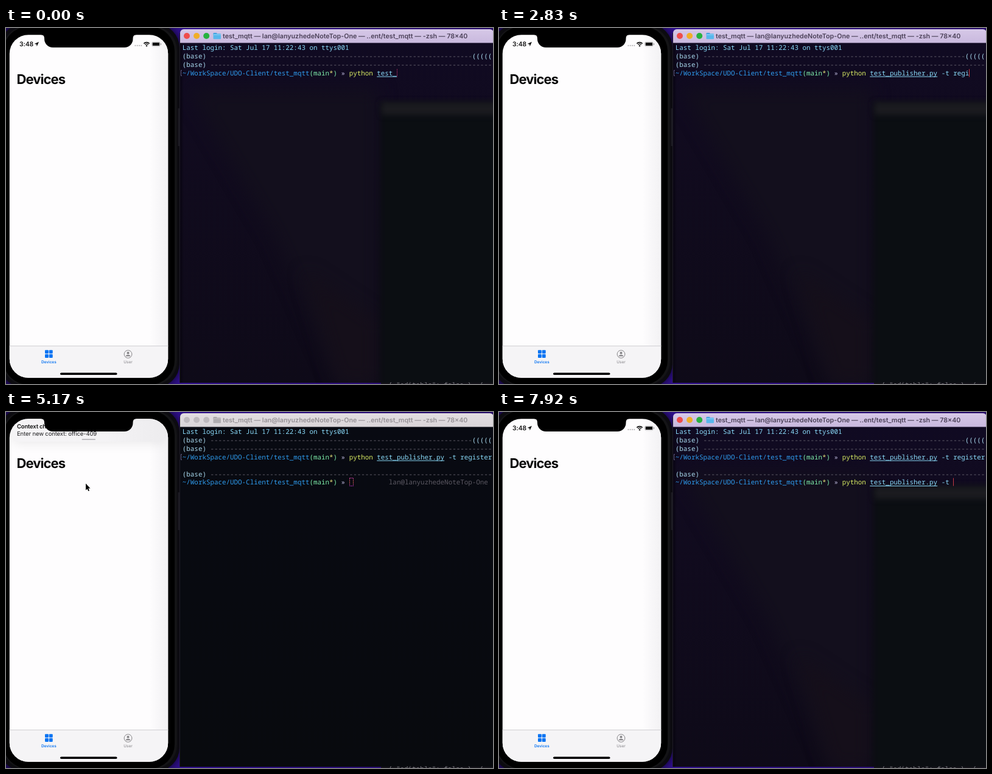
Recreate the animation shown at these times as an HTML page with a canvas. Size 800 px wide and 585 px high, loop 8 s.

```html
<!DOCTYPE html>
<html lang="en">
<head>
<meta charset="utf-8">
<title>Device context demo</title>
<style>
html, body { margin: 0; width: 100%; height: 100%; overflow: hidden; background: #000; }
canvas { display: block; width: 800px; height: 585px; }
</style>
</head>
<body>
<canvas id="stage" width="800" height="585"></canvas>
<script>
const W = 800, H = 585, LOOP = 8000, STEP = 1000 / 12;
const SANS = 'Inter, "Liberation Sans", sans-serif';
const MONO = '500 10.87px "Noto Sans Mono", "DejaVu Sans Mono", monospace';
const COL = 6.52, ROW = 13.86, LEFT = 289.8, BASE = 36.2;
const HOST = 'lan@lanyuzhedeNoteTop-One';
const SCRIPT = 'python test_publisher.py -t register';
const INK = '#8bdcfb', PALE = '#a9d9ee', DIM = '#6b6773', BLUE = '#2f9df0', GREEN = '#7ff0ac';

const stage = document.getElementById('stage');
let c = stage.getContext('2d');

const clamp = v => Math.max(0, Math.min(1, v));
const span = (t, a, b) => clamp((t - a) / (b - a));
const smooth = p => p * p * (3 - 2 * p);
const easeOut = p => 1 - (1 - p) ** 3;
const mix = (a, b, p) => a + (b - a) * p;

function rect(x, y, w, h, fill) {
  c.fillStyle = fill;
  c.fillRect(x, y, w, h);
}
function pill(x, y, w, h, r, fill) {
  c.beginPath();
  c.roundRect(x, y, w, h, r);
  c.fillStyle = fill;
  c.fill();
}
function dot(x, y, r, fill) {
  c.beginPath();
  c.arc(x, y, r, 0, 7);
  c.fillStyle = fill;
  c.fill();
}
function poly(points, fill, stroke, width = 1) {
  c.beginPath();
  points.forEach(([x, y]) => c.lineTo(x, y));
  c.closePath();
  if (stroke) { c.strokeStyle = stroke; c.lineWidth = width; c.stroke(); }
  if (fill) { c.fillStyle = fill; c.fill(); }
}
function label(s, x, y, size, fill, weight = 400, align = 'left', track = 0) {
  c.font = `${weight} ${size}px ${SANS}`;
  c.textRendering = 'geometricPrecision';
  c.letterSpacing = track + 'px';
  c.textAlign = align;
  c.fillStyle = fill;
  c.fillText(s, x, y);
  c.letterSpacing = '0px';
}
function linear(x0, y0, x1, y1, ...stops) {
  const g = c.createLinearGradient(x0, y0, x1, y1);
  stops.forEach(([p, color]) => g.addColorStop(p, color));
  return g;
}

// Draws text on the terminal's character grid.
function cells(s, col, row, fill) {
  c.font = MONO;
  c.textAlign = 'left';
  c.fillStyle = fill;
  [...s].forEach((ch, i) => {
    if (ch !== ' ') c.fillText(ch, LEFT + (col + i) * COL, BASE + row * ROW);
  });
}

// Builds the see-through terminal backdrop once.
function makeBackdrop() {
  const layer = document.createElement('canvas');
  layer.width = W;
  layer.height = H;
  const main = c;
  c = layer.getContext('2d');
  rect(286, 24, 514, 560, linear(286, 24, 286, 584, [0, '#100a22'], [.25, '#110b1f'], [1, '#0e0a18']));
  c.filter = 'blur(14px)';
  poly([[300, 100], [612, 100], [612, 590], [550, 590], [440, 340]], '#130f1d');
  poly([[490, 400], [610, 480], [610, 584], [545, 584]], '#150f1a');
  c.filter = 'blur(5px)';
  rect(615, 122, 210, 480, '#0b0e12');
  rect(617, 122, 210, 21, '#1b1b20');
  c.filter = 'none';
  rect(286, 24, 6, 560, linear(286, 0, 292, 0, [0, 'rgba(5,2,12,.7)'], [1, 'rgba(5,2,12,0)']));
  c = main;
  return layer;
}
const backdrop = makeBackdrop();

function drawDesktop() {
  rect(0, 0, W, H, linear(0, 0, W, 0, [0, '#220a66'], [.36, '#2f0f8c'], [1, '#260b68']));
  rect(616, 583, 184, 2, '#14131a');
  c.save();
  c.shadowColor = 'rgba(0,0,0,.8)';
  c.shadowBlur = 14;
  pill(-10, -6, 295, 596, 38, '#0c0b10');
  c.restore();
  pill(-6, -3, 287, 590, 40, '#141416');
  pill(-4, -2, 281, 588, 40, '#000');
  rect(282.5, 132, 2.5, 62, '#1c1b22');
}

function drawStatus() {
  label('3:48', 22, 30.3, 10.4, '#111', 600, 'left', -.1);
  poly([[54, 22.7], [50.7, 30.3], [50, 26.8], [46.6, 26]], '#111');
  for (let i = 0; i < 4; i++) dot(212.4 + i * 3.3, 28.9, 1.05, '#b9b8bb');
  c.strokeStyle = '#111';
  c.lineWidth = 1.6;
  [6.4, 3.8].forEach(r => {
    c.beginPath();
    c.arc(231, 30, r, -Math.PI * .76, -Math.PI * .24);
    c.stroke();
  });
  dot(231, 29.3, 1.2, '#111');
  c.beginPath();
  c.roundRect(239.7, 23, 13.4, 7, 2);
  c.lineWidth = .6;
  c.strokeStyle = '#8a8a8c';
  c.stroke();
  pill(240.7, 24, 11.4, 5, 1, '#111');
  rect(254, 25.3, 1, 2.4, '#8a8a8c');
}

function drawTabs() {
  rect(5, 522, 262, 54, '#f5f4f6');
  rect(5, 522, 262, 1, '#d0cfd3');
  for (const x of [64, 70.8])
    for (const y of [529.2, 536]) pill(x, y, 5.9, 5.9, 1, '#0a74f2');
  label('Devices', 70.3, 550.8, 6.4, '#0a74f2', 600, 'center');
  c.beginPath();
  c.arc(200.5, 536, 6.4, 0, 7);
  c.lineWidth = 1;
  c.strokeStyle = '#858487';
  c.stroke();
  dot(200.5, 533.9, 2, '#858487');
  c.beginPath();
  c.ellipse(200.5, 539.6, 3.9, 2.6, 0, Math.PI, 0);
  c.fill();
  label('User', 200.5, 550.8, 6.4, '#929195', 500, 'center');
  pill(89, 566.4, 93.5, 3.6, 1.8, '#000');
}

function drawBanner(dy) {
  c.save();
  c.translate(0, dy);
  c.shadowColor = 'rgba(0,0,0,.08)';
  c.shadowBlur = 18;
  c.shadowOffsetY = 3;
  pill(10.5, 30.5, 250, 54, 9, linear(10, 0, 261, 0, [0, '#f5f4f6'], [.6, '#f4f3f5'], [1, '#edecee']));
  c.shadowColor = 'transparent';
  pill(17, 36, 12.5, 12.5, 2.5, '#86cdf8');
  label('UDO CLIENT', 34, 45.5, 8.3, '#7d7c80', 400, 'left', -.1);
  label('now', 252, 45.5, 8.4, '#7d7c80', 400, 'right');
  label('Context change', 18, 63, 9.5, '#111', 600, 'left', -.2);
  label('Enter new context: office-409', 18, 75, 9.5, '#1c1c1e', 400, 'left', -.12);
  pill(124.5, 80, 22.5, 1.8, .9, '#b7b6ba');
  c.restore();
}

function drawNotch() {
  c.beginPath();
  c.moveTo(55, 10);
  c.lineTo(57, 11);
  c.quadraticCurveTo(63, 11, 63, 17);
  c.arcTo(63, 32, 78, 32, 14);
  c.arcTo(208.5, 32, 208.5, 18, 14);
  c.lineTo(208.5, 17);
  c.quadraticCurveTo(208.5, 11, 214.5, 11);
  c.lineTo(217, 10);
  c.fillStyle = '#000';
  c.fill();
}

function drawPhone(t) {
  c.save();
  c.beginPath();
  c.roundRect(5.8, 11.2, 260.4, 563.6, 31);
  c.clip();
  rect(5, 11, 262, 565, '#fefdfe');
  rect(236, 11, 31, 512, linear(236, 0, 267, 0, [0, 'rgba(240,239,242,0)'], [1, '#f3f2f4']));
  label('Devices', 17.6, 92, 22, '#080808', 700, 'left', -.95);
  drawStatus();
  drawTabs();
  if (t >= 3500 && t < 5400) {
    const shown = easeOut(span(t, 3500, 3880)) - smooth(span(t, 5000, 5370));
    drawBanner(mix(-84, 0, shown));
  }
  c.restore();
  drawNotch();
}

function drawTitleBar(active) {
  c.beginPath();
  c.roundRect(286, 2, 515, 22.5, [6, 6, 0, 0]);
  c.fillStyle = active
    ? linear(0, 2, 0, 24, [0, '#d6c8e7'], [1, '#c9b9de'])
    : linear(0, 2, 0, 24, [0, '#e2dde1'], [1, '#dad5d9']);
  c.fill();
  const lights = active ? ['#ef4d4b', '#f0ae28', '#27b23f'] : Array(3).fill('#bfbabf');
  lights.forEach((color, i) => dot(297 + i * 16.1, 13, 5, color));
  pill(340.5, 8, 6, 4, 1, active ? '#3497d8' : '#a8a4a8');
  pill(340.5, 9.3, 12.5, 9, 1, active ? '#58b7ec' : '#b0acb0');
  rect(340.5, 10.6, 12.5, .8, active ? '#a3daf8' : '#ccc8cb');
  label(`test_mqtt — ${HOST} — ..ent/test_mqtt — -zsh — 78×40`,
    356, 16.9, 10.7, active ? '#4b4058' : '#969196', 600);
}

function drawPrompt(row) {
  cells('~/WorkSpace/UDO-Client/test_mqtt', 0, row, BLUE);
  cells('(main', 32, row, GREEN);
  cells('*', 37, row, '#e6e27a');
  cells(')', 38, row, GREEN);
  cells('»', 40, row, '#b9b5d8');
}

function drawCommand(text, row) {
  cells(text.slice(0, 6), 42, row, '#d9ec63');
  cells(text.slice(7), 49, row, INK);
  const end = Math.min(text.length, 24);
  if (end > 7) rect(LEFT + 49 * COL, BASE + row * ROW + 1.7, (end - 7) * COL, 1, INK);
}

function drawCaret(col, row, active, idle) {
  if (col >= 78) { col = 0; row++; }
  const x = Math.round(LEFT + col * COL) + .5, y = Math.round(BASE + row * ROW) - 10.5;
  c.save();
  c.lineWidth = 1;
  if (!active) {
    c.strokeStyle = linear(0, y, 0, y + 13, [0, '#c93ba0'], [.5, '#e0663f'], [1, '#b432b8']);
    c.setLineDash([2, 1]);
    c.strokeRect(x, y, 6, 13);
  } else {
    c.strokeStyle = idle ? '#b52c68' : '#c83a43';
    if (idle) c.setLineDash([1.5, 1]);
    c.beginPath();
    c.moveTo(x, y);
    c.lineTo(x, y + 13);
    c.stroke();
  }
  c.restore();
}

// Times at which each key lands, and how much of the command is then visible.
const firstKeys = [[0, 12], [330, 13], [500, 14], [670, 15], [1000, 24], [1330, 25],
  [1580, 26], [1750, 27], [2080, 28], [2330, 29], [2500, 30], [2670, 31], [2750, 32],
  [2920, 33], [3000, 34], [3080, 35], [3170, 36]];
const lengthAt = (keys, t) => keys.reduce((n, [at, len]) => t >= at ? len : n, 0);

function secondLength(t) {
  if (t < 6670) return 0;
  return SCRIPT.length - Math.round(8 * span(t, 6990, 7830));
}

function drawTerminal(t) {
  const active = t < 4830 || t >= 5910;
  rect(285, 8, 1, 575, '#1f1c27');
  if (active) c.drawImage(backdrop, 286, 24, 514, 559, 286, 24, 514, 559);
  else rect(286, 24, 514, 559, linear(0, 24, 0, 583, [0, '#080a12'], [1, '#080a0e']));
  drawTitleBar(active);

  cells('Last login: Sat Jul 17 11:22:43 on ttys001', 0, 0, INK);
  cells('(base)', 0, 1, PALE);
  cells('-'.repeat(66), 7, 1, DIM);
  cells('(((((', 73, 1, PALE);
  cells('(base)', 0, 2, PALE);
  cells('-'.repeat(71), 7, 2, DIM);
  drawPrompt(3);
  c.strokeStyle = '#625c82';
  c.lineWidth = 1;
  c.beginPath();
  c.moveTo(289, 69.5);
  c.lineTo(287.5, 69.5);
  c.lineTo(287.5, 78.5);
  c.lineTo(289, 78.5);
  c.stroke();

  const first = lengthAt(firstKeys, t);
  drawCommand(SCRIPT.slice(0, first), 3);
  if (t < 3410) {
    drawCaret(42 + first, 3, active, t < 80);
  } else if (t < 3660) {
    drawCaret(0, 4, active, false);
  } else {
    const second = secondLength(t);
    cells('(base)', 0, 5, PALE);
    cells('-'.repeat(71), 7, 5, DIM);
    drawPrompt(6);
    drawCommand(SCRIPT.slice(0, second), 6);
    if (!second) cells(HOST, 52, 6, '#5c5963');
    drawCaret(42 + second, 6, active, !second);
  }
}

function drawBottomEdge() {
  c.save();
  c.beginPath();
  c.rect(616, 582, 184, 3);
  c.clip();
  c.font = MONO;
  c.textAlign = 'left';
  c.fillStyle = '#77767d';
  c.fillText('{ "editable": false }, {', 628, 590);
  c.restore();
}

function drawArrow(x, y) {
  const shape = [[0, 0], [0, 11], [2.5, 8.7], [4.2, 12.6], [6, 11.8], [4.3, 8], [7.5, 8]];
  poly(shape.map(([a, b]) => [x + a, y + b]), '#000', '#fff', 1.6);
}

function drawBeam(x, y) {
  const stroke = (color, width) => {
    c.strokeStyle = color;
    c.lineWidth = width;
    c.beginPath();
    for (const s of [-1, 1]) {
      c.moveTo(x - 3.5, y + s * 6.5);
      c.quadraticCurveTo(x, y + s * 6.5, x, y + s * 4.5);
      c.quadraticCurveTo(x, y + s * 6.5, x + 3.5, y + s * 6.5);
    }
    c.moveTo(x, y - 5);
    c.lineTo(x, y + 5);
    c.moveTo(x - 2, y + 1.5);
    c.lineTo(x + 2, y + 1.5);
    c.stroke();
  };
  c.lineCap = 'round';
  stroke('#e8e6ea', 3);
  stroke('#111', 1);
  c.lineCap = 'butt';
}

function drawPointer(t) {
  if (t < 4240 || t >= 6660) return;
  const away = smooth(span(t, 4240, 4740)) - smooth(span(t, 5410, 5910));
  const x = mix(493.5, 131, away), y = mix(329, 117.5, away);
  if (x > 286) drawBeam(x, y);
  else drawArrow(x, y);
}

function frame(now) {
  const elapsed = now % LOOP;
  const t = Math.floor(elapsed / STEP + .06) * STEP % LOOP;
  drawDesktop();
  drawPhone(t);
  drawTerminal(t);
  drawBottomEdge();
  drawPointer(t);
  requestAnimationFrame(frame);
}
requestAnimationFrame(frame);
</script>
</body>
</html>
```
